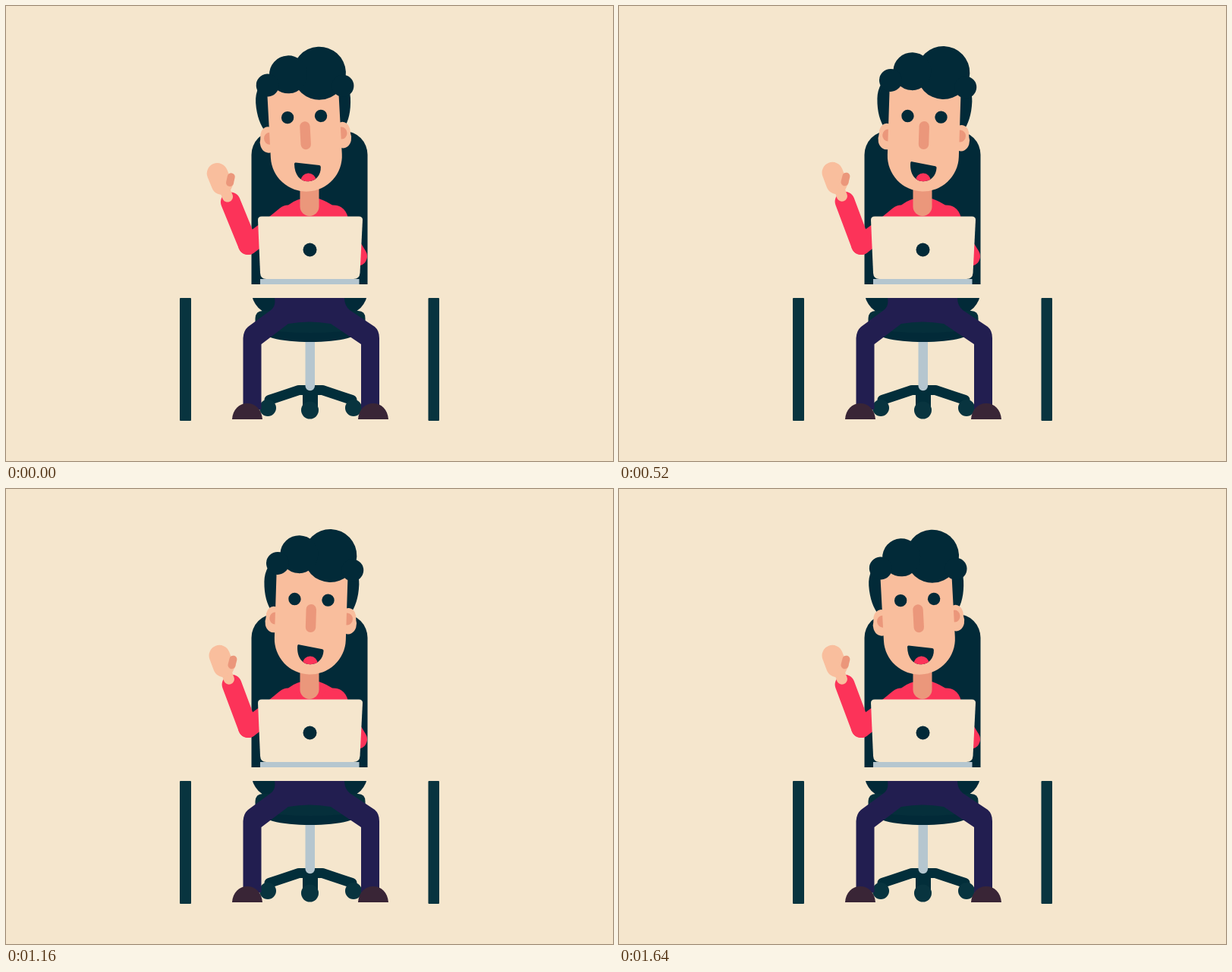
An HTML page for the animation above (1.68 s loop, 800 by 600 pixels).

```html
<!DOCTYPE html>
<html lang="en">
<head>
<meta charset="utf-8">
<title>Waving at the desk</title>
<style>
  html, body { margin: 0; width: 100%; height: 100%; overflow: hidden; background: #f5e6cd; }
  svg { display: block; width: 100%; height: 100%; }
  .bg { fill: #f5e6cd; }
  .dark { fill: #022a38; }
  .frame { fill: #08343f; }
  .skin { fill: #f9be9d; }
  .shade { fill: #eb977b; }
  .red { fill: #fc3359; }
  .navy { fill: #221e50; }
  .shoe { fill: #392536; }
  .steel { fill: #b5c6cf; }
  .limb { fill: none; stroke-linecap: round; stroke-linejoin: round; }
  .sleeve { stroke: #fc3359; stroke-width: 26; }
</style>
</head>
<body>
<svg viewBox="0 0 800 600">
  <defs>
    <path id="mouth" d="M384.5 205.6 L415.500 210.700 Q417.200 211 417.200 213 C417 224 409.500 231.200 400 231.200 C389.500 231.200 382 222 382.600 207.200 Q382.800 205.300 384.500 205.600Z"/>
    <clipPath id="inMouth"><use href="#mouth"/></clipPath>
  </defs>

  <!-- chair -->
  <rect class="dark" x="323.5" y="165" width="153" height="242" rx="31"/>
  <path class="limb" d="M347 519.5 L386 506.5 H417 L456 519.5 M401 508 V526" stroke="#022e3a" stroke-width="13"/>
  <path d="M391 508 H411 V528 H391Z" fill="#022e3a"/>
  <g class="frame">
    <circle cx="345" cy="530" r="11"/>
    <circle cx="458" cy="530" r="11"/>
    <circle cx="400.5" cy="533" r="11.5"/>
  </g>
  <path class="steel" d="M394.5 436 H407 V501 a6.25 6.25 0 0 1 -12.5 0Z"/>
  <path class="dark" d="M330 420 H472 C470 437 440 443 401 443 S332 437 330 420Z"/>
  <path fill="#052f3b" d="M338 402 H464 Q473.5 402 473.5 412 V417 Q473 422 470 425 Q440 431 401 431 T332 425 Q329 422 328.5 417 V412 Q329 402 338 402Z"/>

  <!-- legs -->
  <path class="navy" d="M354 385 H446 Q446 395 453 401 L486 423 Q492 428 492 438 V532 H468 V446 L428 419 Q400 414 372 419 L336.5 446 V532 H312.5 V438 Q313 428 319 423 L349 401 Q356 396 354 385Z"/>
  <path class="shoe" d="M298 545 C299 532 307 524 318 524 S337 532 338 545Z M464 545 C465 532 473 524 484 524 S503 532 504 545Z"/>

  <!-- torso -->
  <path class="red" d="M347 278 L361 266.500 Q366 262.500 372 262.500 L379 258 Q388 253 400 252.500 Q413 253 422 258 L430 262.500 Q438 262.500 442 265.500 Q449 270 451 280 V350 H347Z"/>
  <path class="limb sleeve" d="M319 315 L372 276 M430 276 L463 330"/>
  <path class="shade" d="M387.5 230 H412.5 V264.5 a12.5 12.5 0 0 1 -25 0Z"/>

  <g id="head">
    <g class="skin">
      <ellipse cx="350" cy="171" rx="10" ry="12.5"/>
      <ellipse cx="448.5" cy="170" rx="10" ry="12.5"/>
    </g>
    <g class="shade">
      <ellipse cx="352" cy="172" rx="7.5" ry="8"/>
      <ellipse cx="446.8" cy="170" rx="7.5" ry="8"/>
    </g>
    <path class="dark" d="M341 104 Q336 113 336.2 124 C336.5 142 341 154 347 163 H451 C457 154 461 142 461.2 124 Q461 113 457 104Z"/>
    <g class="skin">
      <path d="M340 171 a10 12.5 0 0 1 20 -4 V183 a10 12.5 0 0 1 -20 -12Z"/>
      <path d="M458.5 170 a10 12.5 0 0 0 -20 -4 V182 a10 12.5 0 0 0 20 -12Z"/>
    </g>
    <g class="shade">
      <ellipse cx="352" cy="172" rx="7.5" ry="8"/>
      <ellipse cx="446.8" cy="170" rx="7.5" ry="8"/>
    </g>
    <path class="skin" d="M352 95 H446 V197.5 a47 47 0 0 1 -94 0Z"/>
    <g id="hair" class="dark">
      <circle cx="422" cy="88.3" r="35"/>
      <circle cx="381" cy="87.8" r="25"/>
      <circle cx="353" cy="100.5" r="15"/>
      <circle cx="452" cy="106.6" r="14.5"/>
    </g>
    <g class="dark">
      <ellipse class="eye" cx="377" cy="145.7" rx="8.2"/>
      <ellipse class="eye" cx="421" cy="145.9" rx="8.2"/>
      <use href="#mouth"/>
    </g>
    <rect class="shade" x="392.5" y="152" width="13.4" height="37" rx="6.7"/>
    <circle class="red" cx="400" cy="230.5" r="10" clip-path="url(#inMouth)"/>
  </g>

  <!-- forearm, upright around the elbow -->
  <g id="arm">
    <path class="limb sleeve" d="M0 0 V-61"/>
    <g class="limb" stroke="#f9be9d">
      <path d="M-1 -69 V-82" stroke-width="14"/>
      <path d="M-1.9 -102.5 V-87" stroke-width="27.5"/>
      <path d="M9 -85 L3 -80" stroke-width="10"/>
    </g>
    <path class="limb" d="M13.3 -91.5 L8.8 -85" stroke="#eb977b" stroke-width="10"/>
  </g>

  <!-- laptop and desk -->
  <path class="bg" d="M337 277.5 H465 Q470 277.5 470 282 L466.5 352 Q466 360 458 360 H343 Q335.5 360 335 352 L332 282 Q332 277.5 337 277.5Z"/>
  <circle class="dark" cx="400.5" cy="321.5" r="9"/>
  <rect class="steel" x="335" y="360" width="130.5" height="7.5"/>
  <rect class="bg" x="229" y="367" width="342" height="18"/>
  <g class="frame">
    <rect x="229" y="385" width="15" height="162" rx="1"/>
    <rect x="556.5" y="385" width="14.5" height="162" rx="1"/>
  </g>
</svg>
<script>
  const LOOP = 1680, STEP = 40, WAVES = 3;
  const [head, hair, arm] = ['head', 'hair', 'arm'].map(id => document.getElementById(id));
  const eyes = document.querySelectorAll('.eye');

  // Sine-eased swing from a to b and back, n times per loop
  const swing = (t, a, b, n) => a + (b - a) * (1 - Math.cos(2 * Math.PI * n * t / LOOP)) / 2;

  function draw(t) {
    head.setAttribute('transform', `rotate(${swing(t, -3.1, 4.1, 1)} 400 256)`);
    hair.setAttribute('transform', `translate(0 ${swing(t, 1.3, -2.3, 1)})`);
    arm.setAttribute('transform', `translate(319 315) rotate(${swing(t, -22.2, 12.1, WAVES)})`);
    const open = Math.min(1, Math.max(0.08, Math.abs(t - LOOP / 2) / 80));
    eyes.forEach(e => e.setAttribute('ry', 8.2 * open));
  }

  let start;
  function tick(now) {
    start ??= now;
    draw(Math.floor((now - start) % LOOP / STEP) * STEP);
    requestAnimationFrame(tick);
  }
  draw(0);
  requestAnimationFrame(tick);
</script>
</body>
</html>
```
